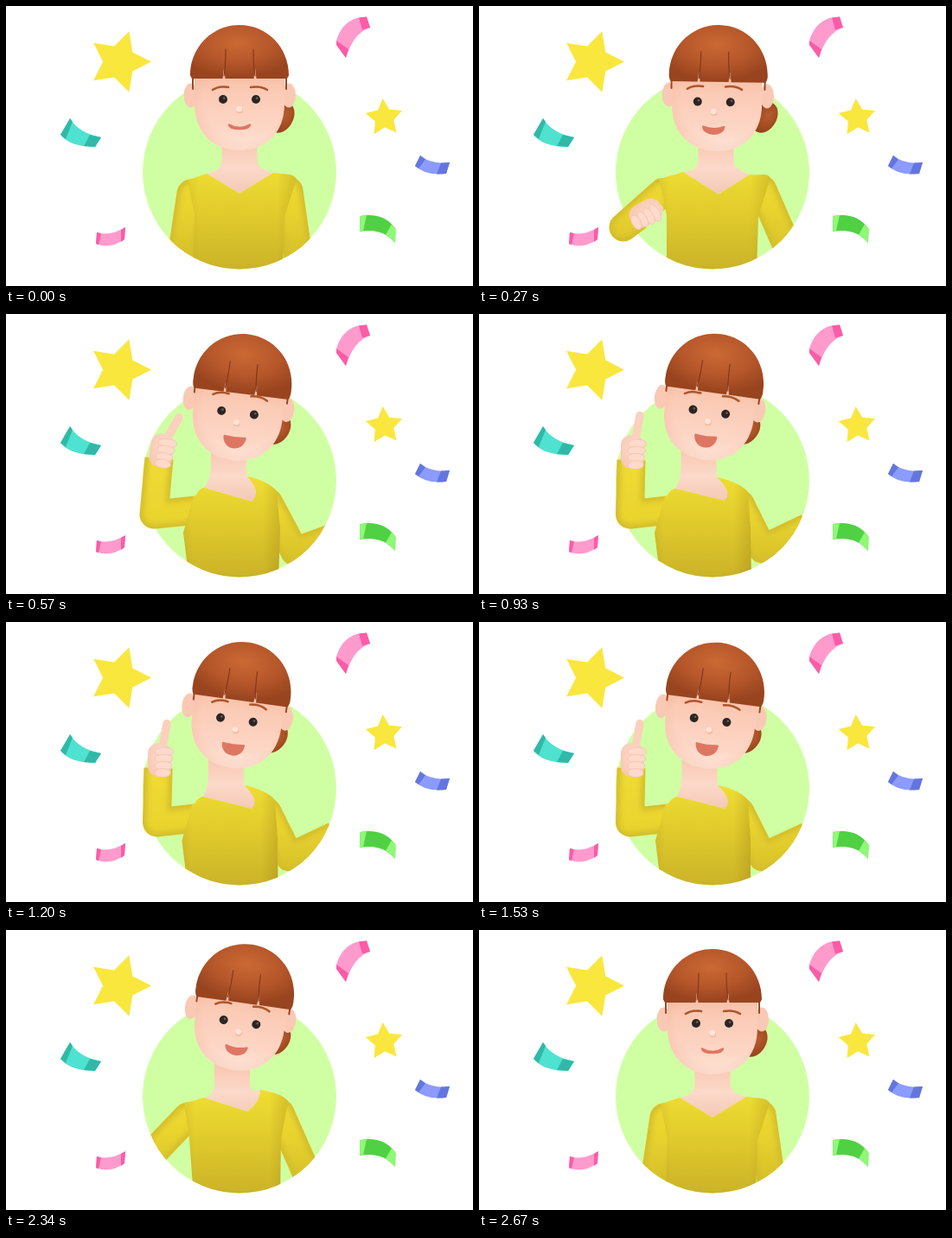
Recreate the animation shown at these times as an HTML page. Size 540x324 px, loop 2700 ms.

```html
<!DOCTYPE html>
<html lang="en">
<head>
<meta charset="utf-8">
<title>Thumbs up</title>
<style>
html, body { margin: 0; width: 100%; height: 100%; overflow: hidden; background: #fff; }
svg { display: block; width: 100%; height: 100%; }
.limb { fill: none; stroke-linejoin: round; stroke-linecap: butt; }
.brow { fill: none; stroke: #ad5529; stroke-width: 2.5; stroke-linecap: round; }
.part { fill: none; stroke: #80361a; stroke-width: 1.1; stroke-linecap: round; }
.side { fill: none; stroke: #9c4720; stroke-width: 2; stroke-linecap: round; }
</style>
</head>
<body>
<svg viewBox="0 0 540 324" xmlns="http://www.w3.org/2000/svg">
  <defs>
    <clipPath id="disc"><circle cx="270" cy="192.5" r="112"/></clipPath>
    <filter id="soft" x="-30%" y="-30%" width="160%" height="160%"><feGaussianBlur stdDeviation="3"/></filter>
    <linearGradient id="shirt" gradientUnits="userSpaceOnUse" x1="0" y1="190" x2="0" y2="305">
      <stop offset="0" stop-color="#efdc32"/><stop offset=".4" stop-color="#e2cd2d"/><stop offset="1" stop-color="#cbb328"/>
    </linearGradient>
    <linearGradient id="sleeve" gradientUnits="userSpaceOnUse" x1="0" y1="165" x2="0" y2="300">
      <stop offset="0" stop-color="#efdc33"/><stop offset=".5" stop-color="#ead52f"/><stop offset="1" stop-color="#d3bc2a"/>
    </linearGradient>
    <linearGradient id="sides">
      <stop offset="0" stop-color="#8a6a10" stop-opacity=".12"/><stop offset=".1" stop-color="#8a6a10" stop-opacity="0"/>
      <stop offset=".82" stop-color="#8a6a10" stop-opacity="0"/><stop offset="1" stop-color="#8a6a10" stop-opacity=".24"/>
    </linearGradient>
    <linearGradient id="neckSkin" gradientUnits="userSpaceOnUse" x1="0" y1="160" x2="0" y2="215">
      <stop offset="0" stop-color="#f9c9b3"/><stop offset=".5" stop-color="#fcd9c9"/><stop offset="1" stop-color="#f5cab7"/>
    </linearGradient>
    <linearGradient id="faceSkin" x1="0" y1="0" x2="0" y2="1">
      <stop offset="0" stop-color="#f4b699"/><stop offset=".35" stop-color="#fbcbb6"/><stop offset=".75" stop-color="#fdd6c5"/>
      <stop offset="1" stop-color="#fee6da"/>
    </linearGradient>
    <radialGradient id="cheek" cx=".55" cy=".42" r=".6">
      <stop offset=".75" stop-color="#f0a98c" stop-opacity="0"/><stop offset="1" stop-color="#f0a98c" stop-opacity=".25"/>
    </radialGradient>
    <radialGradient id="hairFill" cx=".48" cy=".34" r=".64">
      <stop offset="0" stop-color="#ca6933"/><stop offset=".55" stop-color="#b6572b"/><stop offset="1" stop-color="#98441f"/>
    </radialGradient>
    <radialGradient id="bunFill" cx=".6" cy=".4" r=".6">
      <stop offset="0" stop-color="#b85c2f"/><stop offset="1" stop-color="#934119"/>
    </radialGradient>
    <radialGradient id="handSkin" cx=".6" cy=".4" r=".7">
      <stop offset="0" stop-color="#fddccd"/><stop offset="1" stop-color="#f8c8b2"/>
    </radialGradient>
  </defs>

  <g id="party"></g>
  <circle cx="270" cy="192.5" r="112" fill="#d0ffa3"/>

  <g clip-path="url(#disc)" id="rightArm"></g>
  <g id="leftArm"></g>

  <g id="bun"><ellipse cx="48.5" cy="34" rx="13.5" ry="19" transform="rotate(30 48.5 34)" fill="url(#bunFill)"/></g>
  <path id="neck" fill="url(#neckSkin)"/>
  <g clip-path="url(#disc)">
    <path id="torso" fill="url(#shirt)"/>
    <path id="torsoShade" fill="url(#sides)"/>
  </g>

  <g id="head">
    <g id="ears" fill="#fac9b5">
      <ellipse cx="-56.5" cy="8.5" rx="8" ry="14"/><ellipse cx="57" cy="8.5" rx="8" ry="14"/>
    </g>
    <g id="face">
      <path d="M-52-30V18C-52 53-29 72 0 72S52 53 52 18V-30Z" fill="url(#faceSkin)"/>
      <path d="M-52-30V18C-52 53-29 72 0 72S52 53 52 18V-30Z" fill="url(#cheek)"/>
    </g>
    <path class="side" d="M-54-14V1M54-14V1"/>
    <path id="hair" fill="url(#hairFill)"/>
    <g id="parts">
      <path class="part" d="M-16-45Q-16-26-18-14"/>
      <path class="part" d="M16-45Q16-26 18-14"/>
    </g>
    <g id="brows">
      <path class="brow" d="M-31 2Q-24-3-13-1"/>
      <path class="brow" d="M13-1Q24-3 32 2"/>
    </g>
    <g id="eyes">
      <circle cx="-19" cy="13" r="5" fill="#2d2523"/><circle cx="19" cy="13" r="5" fill="#2d2523"/>
      <circle cx="-17.8" cy="11.6" r="1.3" fill="#6b5f5b"/><circle cx="20.2" cy="11.6" r="1.3" fill="#6b5f5b"/>
      <ellipse cx=".3" cy="26" rx="3.8" ry="3.2" fill="#f5b9a1"/>
      <ellipse cx="-.2" cy="24.3" rx="3.4" ry="3.2" fill="#ffe4d7"/>
    </g>
    <path id="mouth" fill="#dd7763" stroke="#dd7763" stroke-width="2.4" stroke-linejoin="round"/>
  </g>

  <g id="handLayer"><g id="hand">
    <path id="thumb" fill="none" stroke="#fbd0bd" stroke-width="9.5" stroke-linecap="round"/>
    <rect x="-12" y="-29" width="27" height="39" rx="12" fill="url(#handSkin)"/>
    <g id="fingers" fill="#fddacb" stroke="#f3bfa8" stroke-width=".7"></g>
  </g></g>
</svg>
<script>
const LOOP = 2700, STEP = 30;
const $ = id => document.getElementById(id);
const put = (id, attrs) => { for (const k in attrs) $(id).setAttribute(k, attrs[k]); };

// Pose values at rest, wave, thumbs up, sway, hold, lowering
const POSE = {
  hx: [270, 276.5, 271.5, 270, 271, 274],
  hy: [95, 95, 96, 95.5, 96.5, 89],
  tilt: [0, 1, 7, 8, 7.5, 8],
  fx: [0, -4.5, -1.2, -1.2, -1.2, -1],
  fy: [0, 3, 5.5, 5, 4.3, 5],
  bun: [0, 6, -2, -4, -4, -4],
  open: [0, .45, 1, 1, 1, .6],
  neck: [270, 274, 257.5, 254, 255, 261.5],
  nLx: [232, 236, 229, 227, 229, 229], nLy: [194, 192, 201, 202, 202, 194],
  nVx: [270, 277, 284, 284, 284, 279], nVy: [217, 218, 217, 216, 216, 210],
  nRx: [309, 313, 279, 275, 276, 294], nRy: [193, 195, 188, 189, 189, 185],
  bulge: [0, 0, 15, 15, 15, 7],
  tl: [218, 217, 205, 203, 204, 212], wl: [216, 217, 212, 210, 211, 217],
  tr: [322, 323, 317, 314, 314, 318], wr: [320, 321, 315, 315, 314, 317],
  lSx: [214, 212, 221, 219, 220, 210], lSy: [217, 216, 227, 227, 227, 216],
  lEx: [203, 167, 171, 174.5, 174.5, 170], lEy: [290, 256, 232, 232, 232, 258],
  lWx: [197, 184, 177, 176, 176, 158], lWy: [335, 243, 167, 169, 169, 305],
  rSx: [327, 328, 304, 302, 302, 317], rSy: [214, 213, 219, 220, 220, 212],
  rEx: [338, 358, 334, 328, 328, 347], rEy: [290, 282, 275, 272, 272, 280],
  rWx: [340, 366, 378, 380, 380, 353], rWy: [330, 312, 259, 247, 248, 320],
  turn: [70, 60, 9, 0, 0, 20],
  thumb: [0, .2, 1, 1, 1, .5],
  lean: [0, 0, 9, 0, 0, 0]
};
const TIMES = [0, 270, 570, 930, 1530, 2100, 2340, 2640];

// Smooth monotone curve through the key values
function sample(vals, t) {
  const v = [...vals.slice(0, 5), vals[4], vals[5], vals[0]];
  const last = TIMES.length - 1;
  if (t >= TIMES[last]) return v[last];
  let i = 0;
  while (t >= TIMES[i + 1]) i++;
  const slope = k => (v[k + 1] - v[k]) / (TIMES[k + 1] - TIMES[k]);
  const tangent = k => {
    if (k === 0 || k === last) return 0;
    const a = slope(k - 1), b = slope(k);
    return a * b > 0 ? 2 * a * b / (a + b) : 0;
  };
  const h = TIMES[i + 1] - TIMES[i], u = (t - TIMES[i]) / h, w = 1 - u;
  return v[i] * w * w * (1 + 2 * u) + v[i + 1] * u * u * (3 - 2 * u)
    + h * u * w * (w * tangent(i) - u * tangent(i + 1));
}

function star(x, y, r, turn) {
  const pts = [];
  for (let i = 0; i < 10; i++) {
    const a = (turn + i * 36) * Math.PI / 180, d = i % 2 ? r * .51 : r;
    pts.push((x + d * Math.cos(a)).toFixed(1) + ',' + (y + d * Math.sin(a)).toFixed(1));
  }
  return `<polygon points="${pts.join(' ')}" fill="#f9e73e"/>`;
}
const ribbon = (body, ends, main, edge) => `<path d="${body}" fill="${main}"/><path d="${ends}" fill="${edge}"/>`;

$('party').innerHTML = star(131, 64.5, 37, 0) + star(437.3, 129.3, 22.3, -22)
  + ribbon('M382 40Q388 20 405 14L417 12.500 421 25Q402 31 393 60L382 45Z',
    'M408 13.500L417 12.500 421 25 412 27.500ZM382 40L382 45 393 60 396 50Z', '#ff9acd', '#fb5ca7')
  + ribbon('M63 149L74 130Q84 147 110 152L103 163Q74 163 63 149Z',
    'M63 149L74 130 77 134 69 154ZM97 149L110 152 103 163 90 162Z', '#4fe2d0', '#31b9a8')
  + ribbon('M479 173Q492 184 513 181L509 194Q486 197 473 185Z',
    'M479 173L473 185 477 188 485 177.500ZM503 181.500L513 181 509 194 498 194.500Z', '#8b9bff', '#6475de')
  + ribbon('M409.500 243Q437 238 450.500 258L450 274Q435 256 409 261Z',
    'M409.500 243L409 261 413 260.200 417 242ZM450.500 258L450 274 439 264.500 446 252.500Z', '#50d143', '#8ff877')
  + ribbon('M105 262Q120 267 138 256L137 270Q120 282 104 275Z',
    'M105 262L104 275 107 276.500 110 263ZM133 259L138 256 137 270 133 273Z', '#ff9acd', '#fb5ca7');

for (const id of ['leftArm', 'rightArm'])
  $(id).innerHTML = '<path class="limb" stroke="#d4bd2b" stroke-width="33"/>'
    + '<path class="limb" stroke="url(#sleeve)" stroke-width="24" filter="url(#soft)"/>';
$('fingers').innerHTML = [0, 1, 2, 3].map(i =>
  `<ellipse cx="${7 - i * .6}" cy="${-19 + i * 8.2}" rx="${11 - i * .6}" ry="5"/>`).join('');

function limb(id, p, side, inward) {
  const [sx, sy, ex, ey, wx, wy] = ['Sx', 'Sy', 'Ex', 'Ey', 'Wx', 'Wy'].map(k => p[side + k]);
  const d = `M${sx + inward} ${sy + 5}L${sx} ${sy}L${ex} ${ey}L${wx} ${wy}`;
  for (const path of $(id).children) path.setAttribute('d', d);
}

function drawBody(p) {
  const bend = `Q${(p.nVx + p.nRx) / 2 + p.bulge} ${(p.nVy + p.nRy) / 2 + p.bulge * .3}`;
  const n = p.neck;
  put('neck', { d: `M${n - 20.5} 135V178Q${n - 20.5} 191 ${p.nLx} ${p.nLy}L${p.nVx} ${p.nVy}${bend} ${p.nRx} ${p.nRy}`
    + `Q${n + 20.5} 189 ${n + 20.5} 178V135Z` });
  const d = `M${p.nLx} ${p.nLy}C${p.nLx - 10} ${p.nLy + 3} ${p.lSx + 2} ${p.lSy - 17} ${p.lSx - 4} ${p.lSy - 16}`
    + `L${p.tl} ${p.lSy + 26}L${p.wl} 310H${p.wr}L${p.tr} ${p.rSy + 30}L${p.rSx + 9} ${p.rSy - 14}`
    + `C${p.rSx + 4} ${p.rSy - 21} ${p.nRx + 14} ${p.nRy + 2} ${p.nRx} ${p.nRy}${bend} ${p.nVx} ${p.nVy}Z`;
  put('torso', { d });
  put('torsoShade', { d });
}

function drawHead(p) {
  const pose = `translate(${p.hx} ${p.hy}) rotate(${p.tilt})`;
  const shift = (id, x, y) => put(id, { transform: `translate(${x} ${y})` });
  put('head', { transform: pose });
  put('bun', { transform: `${pose} translate(${p.bun} ${-p.fy * .3})` });
  shift('ears', -p.tilt * .25, 0);
  shift('face', p.fx * .2 - p.tilt * .1, p.fy * .35);
  shift('parts', p.fx, p.fy);
  shift('brows', p.fx, -p.fy * .2);
  shift('eyes', p.fx, p.fy);

  const f = p.fy * 1.3 - 11;
  const notch = x => `L${x + 1.5} ${f}L${x} ${f - 12}L${x - 1.5} ${f}`;
  put('hair', { d: `M-57-15C-57-47-32-73 0-73S57-47 57-15Q57.5 ${f - 4} 55 ${f}`
    + notch(p.fx + 18) + notch(p.fx - 18) + `L-55 ${f}Q-57.5 ${f - 4}-57-15Z` });

  const m = p.open, y = 42.5 + p.fy * .8, x = p.fx, low = y + 6 + 10 * m;
  put('mouth', { d: `M${x - 12} ${y}Q${x} ${y + 7 - 5 * m} ${x + 12} ${y}C${x + 11} ${low} ${x - 11} ${low} ${x - 12} ${y}Z` });
}

function draw(t) {
  const p = {};
  for (const k in POSE) p[k] = sample(POSE[k], t);

  limb('rightArm', p, 'r', -14);
  limb('leftArm', p, 'l', 14);
  const raised = t > 195 && t < 2235;
  for (const id of ['leftArm', 'handLayer']) put(id, { 'clip-path': raised ? 'none' : 'url(#disc)' });
  drawBody(p);
  drawHead(p);
  put('hand', { transform: `translate(${p.lWx} ${p.lWy})rotate(${p.turn})` });
  put('thumb', { d: `M4-19L${4 + 6 * p.thumb} ${-19 - 32.5 * p.thumb}`, transform: `rotate(${p.lean} 4 -19)` });
}

const start = performance.now();
function tick() {
  const t = (performance.now() - start) % LOOP;
  draw(Math.floor(t / STEP) * STEP);
  requestAnimationFrame(tick);
}
draw(0);
requestAnimationFrame(tick);
</script>
</body>
</html>
```
